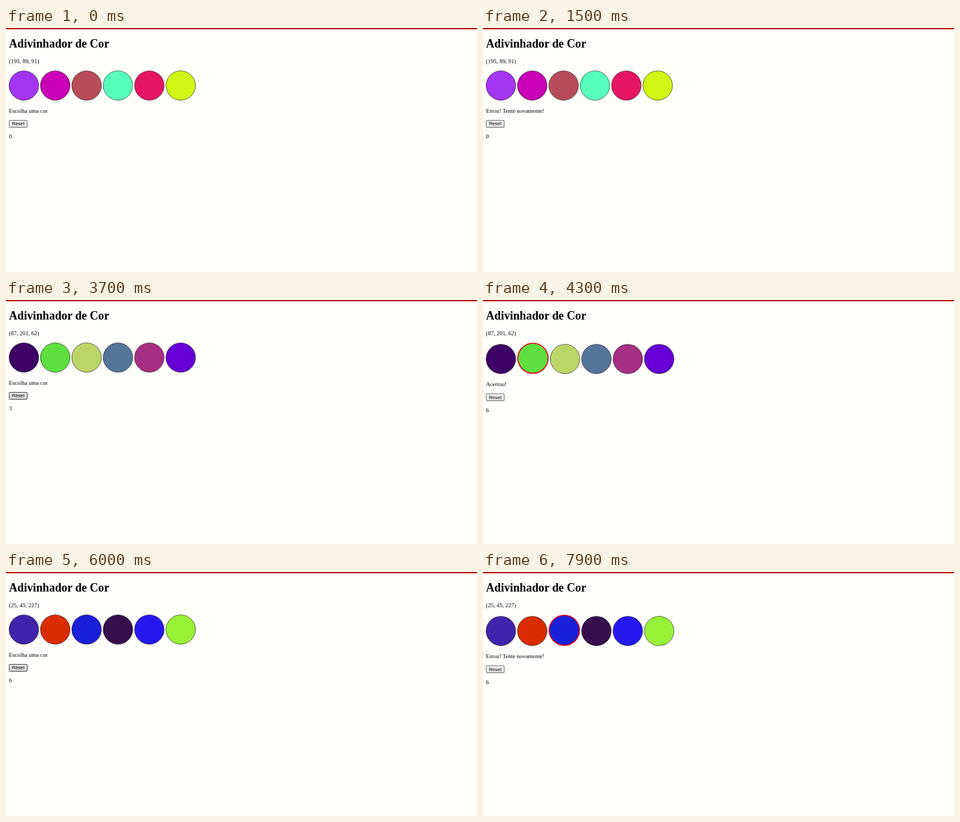
Write an HTML page that moves like this. It is 718 px wide and 374 px high and loops after 8 s.

```html
<!DOCTYPE html>
<html lang="pt">
<head>
<meta charset="utf-8">
<title>Adivinhador de Cor</title>
<style>
  html, body { margin: 0; width: 100%; height: 100%; overflow: hidden; background: #fffffc; }
  .bar { position: absolute; top: 0; left: 0; width: 100%; height: 1.6px; background: #b5000f; }
  .page {
    position: absolute; top: 1.8px; left: 0; width: 1275px; height: 640px; padding: 0 8px;
    transform: scale(.556); transform-origin: 0 0;
    font: 16px/18px "Liberation Serif", "Times New Roman", serif; color: #000;
  }
  h1 { margin: 0; padding: 21.44px 0; font-size: 32px; line-height: 37px; }
  p { margin: 0 0 16px; height: 18px; }
  .balls { margin-bottom: 16px; }
  .ball {
    display: inline-block; width: 80px; height: 80px;
    border: 1px solid #000; border-radius: 50%;
  }
  .ball.hover { border: 3px solid #e3000f; }
  button {
    display: block; box-sizing: border-box; height: 21px; margin: 0 0 16px; padding: 0 6px;
    border: 2px solid #767676; border-radius: 3px; background: #efefef; color: #000;
    font: 13.333px/15px "Liberation Sans", Arial, sans-serif;
  }
  button.hover { border-color: #4f4f4f; background: #e3e3e3; }
</style>
</head>
<body>
<div class="bar"></div>
<div class="page">
  <h1>Adivinhador de Cor</h1>
  <p id="rgb"></p>
  <div class="balls">
    <span class="ball"></span>
    <span class="ball"></span>
    <span class="ball"></span>
    <span class="ball"></span>
    <span class="ball"></span>
    <span class="ball"></span>
  </div>
  <p id="answer"></p>
  <button id="reset" type="button">Reset</button>
  <p id="score"></p>
</div>
<script>
  const LOOP = 8000;
  const PICK = 'Escolha uma cor', WRONG = 'Errou! Tente novamente!', RIGHT = 'Acertou!';
  const rounds = [
    { rgb: '(195, 89, 91)', colors: ['#a435f0', '#c900b5', '#b84d59', '#57ffbd', '#e51564', '#cff614'] },
    { rgb: '(87, 201, 62)', colors: ['#3d0066', '#5de03f', '#bcd568', '#55759a', '#a72f83', '#6600d6'] },
    { rgb: '(25, 45, 227)', colors: ['#3e25ab', '#da2c03', '#1a20d8', '#360f4e', '#2519f0', '#97f136'] }
  ];

  // Each step changes only the listed parts; hover is a ball index or 'reset'.
  const steps = [
    { at: 0, round: 0, answer: PICK, score: 0, hover: null },
    { at: 700, hover: 4 },
    { at: 900, answer: WRONG },
    { at: 1100, hover: null },
    { at: 2300, hover: 2 },
    { at: 2400, answer: RIGHT, score: 3 },
    { at: 2600, hover: null },
    { at: 3000, round: 1, answer: PICK, hover: 'reset' },
    { at: 4000, hover: null },
    { at: 4200, hover: 1 },
    { at: 4300, answer: RIGHT, score: 6 },
    { at: 4500, hover: null },
    { at: 5700, round: 2, answer: PICK, hover: 'reset' },
    { at: 6200, hover: null },
    { at: 6700, answer: WRONG },
    { at: 7300, hover: 4 },
    { at: 7600, hover: null },
    { at: 7800, hover: 2 }
  ];

  const byId = id => document.getElementById(id);
  const [rgb, answer, reset, score] = ['rgb', 'answer', 'reset', 'score'].map(byId);
  const balls = document.querySelectorAll('.ball');
  let shown = -1;

  function render(count) {
    const state = Object.assign({}, ...steps.slice(0, count));
    const round = rounds[state.round];
    rgb.textContent = round.rgb;
    answer.textContent = state.answer;
    score.textContent = state.score;
    reset.classList.toggle('hover', state.hover === 'reset');
    balls.forEach((ball, i) => {
      ball.style.backgroundColor = round.colors[i];
      ball.classList.toggle('hover', state.hover === i);
    });
  }

  function tick() {
    const time = performance.now() % LOOP;
    const count = steps.filter(step => step.at <= time).length;
    if (count !== shown) render(shown = count);
    requestAnimationFrame(tick);
  }
  tick();
</script>
</body>
</html>
```
